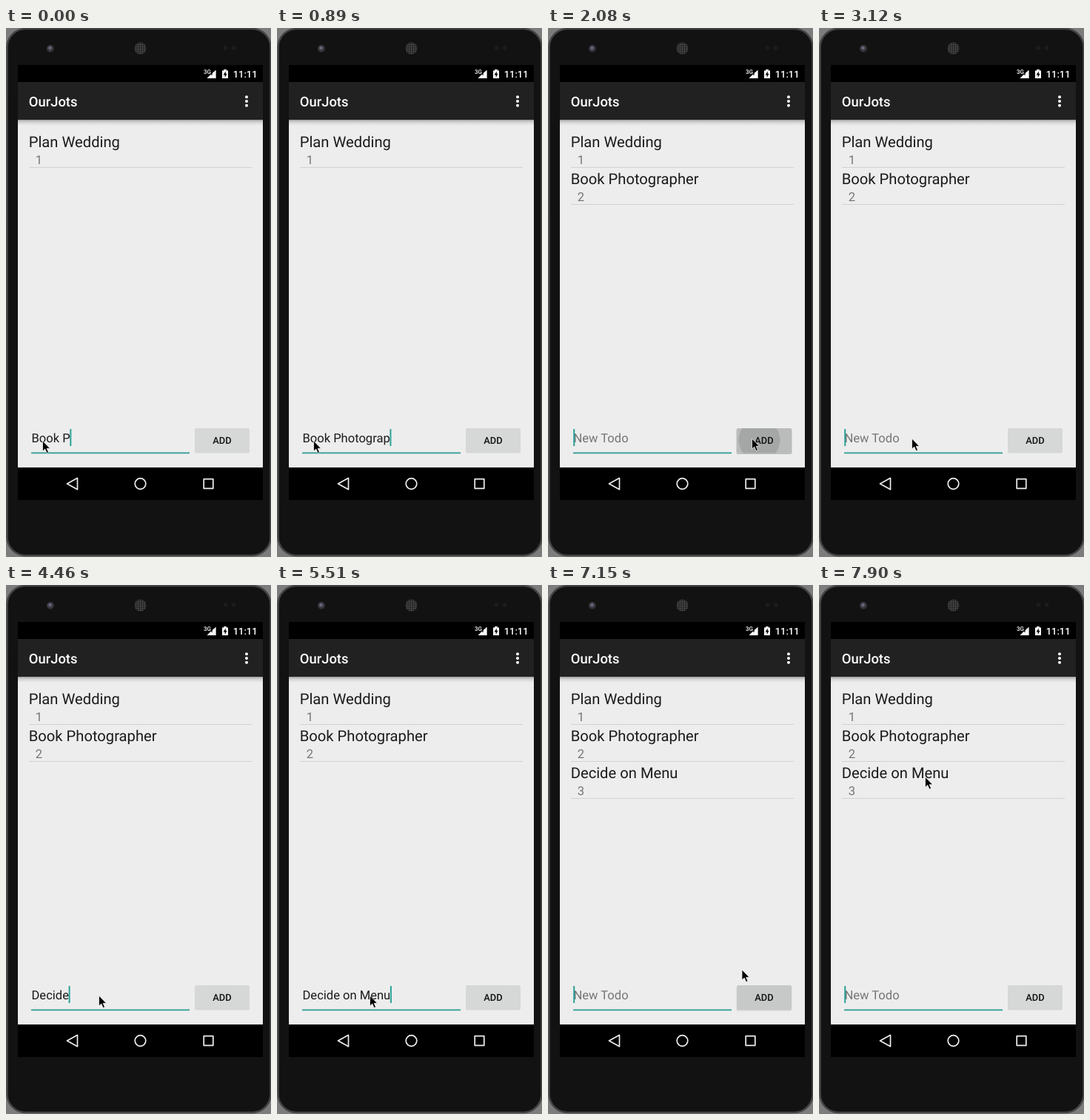
Animation, 358 px wide and 715 px high, one loop 8000 ms. Source, as an HTML page:

```html
<!DOCTYPE html>
<html lang="en">
<head>
<meta charset="utf-8">
<title>Todo list</title>
<style>
  html, body { margin: 0; width: 100%; height: 100%; overflow: hidden; background: #7c7c7c; }
  svg { display: block; width: 358px; height: 715px; }
  text { font-family: Roboto, "Noto Sans", sans-serif; text-rendering: geometricPrecision; white-space: pre; }
  .medium { font-weight: 500; }
  .title { font-size: 20.2px; fill: #1b1b1b; }
  .body { font-size: 16.56px; fill: #1b1b1b; }
  .muted { fill: #757575; }
  .small { font-size: 12.9px; }
  .nav { fill: none; stroke: #eee; stroke-width: 1.7; stroke-linejoin: round; }
</style>
</head>
<body>
<svg viewBox="0 0 358 715">
  <defs>
    <linearGradient id="shade" x2="0" y2="1">
      <stop offset="0" stop-color="#a2a2a2"/>
      <stop offset=".45" stop-color="#d6d6d6"/>
      <stop offset="1" stop-color="#ededed"/>
    </linearGradient>
    <radialGradient id="lens" cx=".45" cy=".4">
      <stop offset="0" stop-color="#8d8da8"/>
      <stop offset=".4" stop-color="#4a4a58"/>
      <stop offset="1" stop-color="#2b2b2e"/>
    </radialGradient>
    <pattern id="mesh" width="3" height="3" patternUnits="userSpaceOnUse">
      <rect width="3" height="3" fill="#262626"/>
      <circle cx="1.5" cy="1.5" r=".9" fill="#555"/>
    </pattern>
    <clipPath id="buttonClip"><rect x="255" y="541" width="74" height="33.5" rx="2"/></clipPath>
  </defs>

  <!-- phone -->
  <rect width="358" height="715" fill="#7c7c7c"/>
  <rect x="1.5" y="1" width="356" height="712" rx="25" fill="#121212" stroke="#444" stroke-width="2.5"/>
  <circle cx="60" cy="28" r="5" fill="url(#lens)"/>
  <circle cx="181.5" cy="27.5" r="8" fill="url(#mesh)"/>
  <circle cx="296.5" cy="27" r="3" fill="#1c1c1c"/>
  <circle cx="307.5" cy="27" r="3" fill="#1c1c1c"/>

  <!-- screen -->
  <rect x="16" y="50" width="331" height="588" fill="#000"/>
  <rect x="16" y="73" width="331" height="51" fill="#212121"/>
  <rect x="16" y="124" width="331" height="470" fill="#ededed"/>
  <rect x="16" y="124" width="331" height="8" fill="url(#shade)"/>

  <!-- status bar -->
  <g fill="#fff">
    <text class="medium" x="267" y="62" font-size="8">3G</text>
    <path d="M283.5 56.500V68H272Z" fill="#777"/>
    <path d="M283.500 57V68H271.500L277 62.500V64H279V60.700Z"/>
    <path d="M292 57.500H294.200V56H297.800V57.500H300V68H292Z"/>
    <path d="M296.800 58.500L293.500 63.500H295.700V67L298.600 61.800H296.800Z" fill="#000"/>
    <text class="medium small" x="306.800" y="67">11:11</text>
    <text class="medium" x="30.800" y="106" font-size="18.400">OurJots</text>
    <circle cx="325" cy="93.300" r="2"/>
    <circle cx="325" cy="99" r="2"/>
    <circle cx="325" cy="104.700" r="2"/>
  </g>

  <g id="list"></g>

  <!-- entry field -->
  <text id="hint" class="body muted" x="34.500" y="560">New Todo</text>
  <text id="entry" class="body" x="34.500" y="560"></text>
  <rect id="caret" y="542" width="2" height="23" fill="#2aa298"/>
  <rect x="34" y="573.500" width="214" height="1.800" fill="#2f9c93"/>

  <!-- button -->
  <rect id="lift" x="254.500" y="541.500" width="75" height="34.500" rx="2.500" fill="#999" opacity="0"/>
  <rect x="255" y="541" width="74" height="33.500" rx="2" fill="#d6d7d7"/>
  <g id="press" clip-path="url(#buttonClip)" opacity="0">
    <rect x="255" y="541" width="74" height="34" fill="#babbbb"/>
    <circle id="ripple" cx="285.500" cy="557" fill="#a5a7a7"/>
  </g>
  <text class="medium small" x="292" y="562" text-anchor="middle" fill="#111">ADD</text>

  <!-- navigation -->
  <path class="nav" d="M82.500 616L96.500 608.300V623.700Z"/>
  <circle class="nav" cx="181.500" cy="616" r="7.300"/>
  <rect class="nav" x="267.200" y="609.700" width="12.600" height="12.600"/>

  <path id="pointer" d="M0 0V14L3.200 11L5.700 16.500L8 15.500L5.600 10.300H10Z" fill="#000" stroke="#fff" stroke-width=".7"/>
</svg>

<script>
  const LOOP = 8000;
  const $ = id => document.getElementById(id);

  $('list').innerHTML = ['Plan Wedding', 'Book Photographer', 'Decide on Menu'].map((label, i) => `
    <g transform="translate(0 ${i * 50})">
      <text class="title" x="30.700" y="161">${label}</text>
      <text class="body muted" x="39.700" y="184">${i + 1}</text>
      <rect x="31" y="188" width="301" height="1" fill="#d2d2d2"/>
    </g>`).join('');
  const rows = [...$('list').children];

  const type = text => ({ text, caret: true });
  const move = (x, y, more) => ({ at: [x, y], ...more });
  const press = (radius, strength, more) => ({ radius, strength, ...more });
  const blink = caret => ({ caret });

  // Each step changes only the listed parts of the state.
  const steps = [
    [0, { text: 'Book P', caret: true, at: [49.5, 558], radius: 0, strength: 0, count: 1 }],
    [150, type('Book Ph')],
    [300, type('Book Pho')],
    [450, type('Book Phot')],
    [600, type('Book Photo')],
    [740, type('Book Photogr')],
    [890, type('Book Photograp')],
    [1040, type('Book Photographe')],
    [1190, type('Book Photographer')],
    [1340, move(80, 561)],
    [1490, move(170, 562)],
    [1640, move(255, 558, blink(false))],
    [1780, move(275.5, 555)],
    [2080, press(28, 1, { text: '', caret: true, count: 2 })],
    [2230, press(46, .7)],
    [2380, press(46, .3, move(250, 555))],
    [2530, press(0, 0, move(165, 555, blink(false)))],
    [2670, move(125.5, 555)],
    [3120, blink(true)],
    [3570, blink(false)],
    [3860, type('D')],
    [4010, type('De')],
    [4160, type('Dec')],
    [4310, type('Deci')],
    [4460, type('Decide')],
    [4610, type('Decide o')],
    [4760, type('Decide on ')],
    [4910, type('Decide on M')],
    [5210, type('Decide on Me')],
    [5360, type('Decide on Men')],
    [5510, type('Decide on Menu')],
    [5960, move(160, 556, blink(false))],
    [6110, move(245, 556)],
    [6250, move(272.5, 555)],
    [6550, blink(true)],
    [6850, press(28, 1, { text: '', caret: true, count: 3 })],
    [7000, press(46, .7)],
    [7150, press(46, .3, move(262, 520))],
    [7300, press(0, 0, move(222, 400))],
    [7450, move(172, 270, blink(false))],
    [7600, move(148, 222)],
    [7750, move(143.5, 259.5)],
    [7900, blink(true)]
  ];

  const stateAt = time => Object.assign({}, ...steps.filter(([start]) => start <= time).map(([, change]) => change));

  const start = performance.now();

  function draw() {
    const s = stateAt((performance.now() - start) % LOOP);
    const entry = $('entry');
    if (entry.textContent !== s.text) entry.textContent = s.text;
    $('hint').style.display = s.text ? 'none' : '';
    const width = s.text ? entry.getComputedTextLength() : 0;
    $('caret').setAttribute('x', 34.2 + width);
    $('caret').style.display = s.caret ? '' : 'none';
    rows.forEach((row, i) => { row.style.display = i < s.count ? '' : 'none'; });
    $('press').setAttribute('opacity', s.strength);
    $('lift').setAttribute('opacity', s.strength * .6);
    $('ripple').setAttribute('r', s.radius);
    $('pointer').setAttribute('transform', `translate(${s.at})`);
    requestAnimationFrame(draw);
  }
  draw();
</script>
</body>
</html>
```
